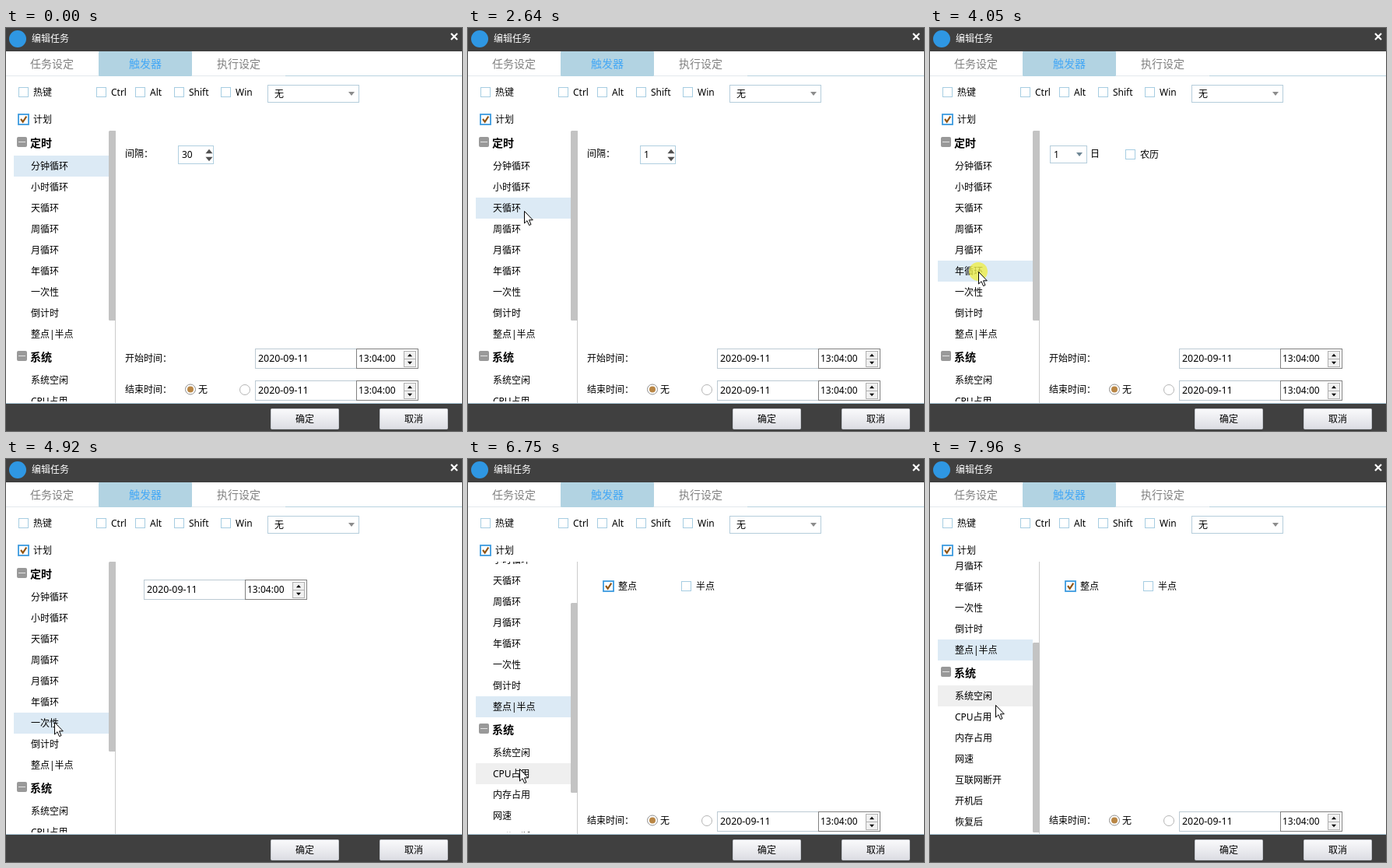
Recreate the animation shown at these times as an HTML page. Size 586 by 518 pixels, loop 8 s.

```html
<!DOCTYPE html>
<html lang="zh-CN">
<head>
<meta charset="utf-8">
<style>
html, body { margin: 0; width: 100%; height: 100%; overflow: hidden; background: #fff; }
svg { display: block; width: 586px; height: 518px; }
text { font-family: "Noto Sans", "Noto Sans CJK SC", "Noto Sans CJK", sans-serif; white-space: pre; }
</style>
</head>
<body>
<svg id="stage" viewBox="0 0 586 518" xmlns="http://www.w3.org/2000/svg">
  <clipPath id="treeClip"><rect x="0" y="132" width="142" height="348"/></clipPath>
  <linearGradient id="face" x2="0" y2="1">
    <stop stop-color="#fafafc"/><stop offset="1" stop-color="#dcdde3"/>
  </linearGradient>
</svg>
<script>
const LOOP = 8000, ROW = 27, HEAD = 32, VIEW_TOP = 132;
const stage = document.getElementById("stage");

function add(parent, tag, attrs = {}) {
  const el = document.createElementNS("http://www.w3.org/2000/svg", tag);
  for (const k in attrs) el.setAttribute(k, attrs[k]);
  parent.appendChild(el);
  return el;
}
const group = (p = stage, attrs) => add(p, "g", attrs);
const fillRect = (p, x, y, width, height, fill, rx = 0) =>
  add(p, "rect", { x, y, width, height, fill, rx });
// Bordered box covering whole pixels, line centred on half pixels
const frame = (p, x, y, w, h, stroke, fill = "#fff", rx = 0) =>
  add(p, "rect", { x: x + .5, y: y + .5, width: w - 1, height: h - 1, stroke, fill, rx });
const path = (p, d, attrs) => add(p, "path", { d, ...attrs });

// Text placed by its left edge and its vertical middle
function label(p, x, cy, str, { size = 12, fill = "#000", weight = 400 } = {}) {
  const el = add(p, "text", { x, y: cy + size * .37, "font-size": size, fill, "font-weight": weight });
  el.textContent = str;
}
function triangle(p, cx, cy, r, dir, fill = "#505050") {
  const h = r * .6 * dir;
  path(p, `M${cx - r} ${cy - h}H${cx + r}L${cx} ${cy + h}Z`, { fill });
}
function checkbox(p, x, y, str, gap, checked) {
  if (checked) {
    add(p, "rect", { x, y, width: 13, height: 13, fill: "#fff", stroke: "#3c9bdf", "stroke-width": 1.8 });
    path(p, `M${x + 3} ${y + 6}L${x + 5.7} ${y + 9.6}L${x + 10.3} ${y + 2.7}`,
      { fill: "none", stroke: "#8f5414", "stroke-width": 2.1 });
  } else frame(p, x, y, 13, 13, "#a6cde2");
  label(p, x + gap, y + 6.5, str);
}
function spinner(p, x, y, w, value) {
  frame(p, x, y, w, 24, "#b0cfe0");
  label(p, x + 5, y + 12, value);
  triangle(p, x + w - 6, y + 7.5, 4.5, -1);
  triangle(p, x + w - 6, y + 17.5, 4.5, 1);
}
function combo(p, x, y, w, value, arrow) {
  frame(p, x, y, w, 23, "#b5cddb");
  label(p, x + (w > 60 ? 9 : 5), y + 11.5, value);
  triangle(p, x + w - 10, y + 11.5, 4, 1, arrow);
}
function dateTime(p, x, y) {
  frame(p, x, y, 131, 26, "#bccad3");
  label(p, x + 4, y + 12.5, "2020-09-11", { size: 12.4 });
  frame(p, x + 130, y, 80, 26, "#808080");
  label(p, x + 133, y + 12.5, "13:04:00");
  for (const dir of [-1, 1]) {
    const top = y + (dir < 0 ? 3 : 13);
    frame(p, x + 191, top, 16, 11, "#b0b0b0", "#f0f0f0");
    triangle(p, x + 199, top + 5.5, 3, dir, "#000");
  }
}
function radio(p, cx, cy, on) {
  add(p, "circle", { cx, cy, r: 6.5, fill: "#fff", stroke: on ? "#909090" : "#b4b4b4" });
  if (on) add(p, "circle", { cx, cy, r: 4, fill: "#b98645" });
}
function button(x, w, str) {
  frame(stage, x, 489, w, 27, "#c5c8ce", "url(#face)", 1);
  label(stage, x + w / 2 - 12, 502.5, str);
}

// Window chrome
fillRect(stage, 0, 0, 586, 518, "#fff");
fillRect(stage, 0, 0, 586, 30, "#404040");
add(stage, "circle", { cx: 15, cy: 14, r: 11, fill: "#2f97e3" });
label(stage, 33, 14, "编辑任务", { fill: "#fff" });
path(stage, "M572 7L580 15M580 7L572 15", { stroke: "#fff", "stroke-width": 2.2 });

fillRect(stage, 0, 61, 119, 1, "#e3e9ed");
fillRect(stage, 239, 61, 120, 1, "#e3e9ed");
fillRect(stage, 359, 61, 227, 1, "#b9d3e0");
fillRect(stage, 119, 30, 120, 32, "#b2d3e2", 1);
label(stage, 31, 46, "任务设定", { size: 14, fill: "#808080" });
label(stage, 158, 46, "触发器", { size: 14, fill: "#45a8f5" });
label(stage, 271, 46, "执行设定", { size: 14, fill: "#808080" });

checkbox(stage, 16, 76, "热键", 19);
[[116, "Ctrl"], [166, "Alt"], [216, "Shift"], [276, "Win"]]
  .forEach(([x, s]) => checkbox(stage, x, 76, s, 19));
combo(stage, 336, 73, 118, "无", "#8c8c8c");
checkbox(stage, 16, 111, "计划", 19, true);

// Tree
fillRect(stage, 140, 132, 1, 350, "#cccccc");
const tree = group(stage, { "clip-path": "url(#treeClip)" });
const list = group(tree);
const hoverBar = fillRect(list, 10, 0, 122, ROW, "#efefef");
const selBar = fillRect(list, 10, 0, 122, ROW, "#dceaf5");
const rowTops = [];
let nextTop = VIEW_TOP;
const sections = [
  ["定时", "分钟循环 小时循环 天循环 周循环 月循环 年循环 一次性 倒计时 整点|半点"],
  ["系统", "系统空闲 CPU占用 内存占用 网速 互联网断开 开机后 恢复后"]
];
for (const [title, items] of sections) {
  fillRect(list, 14, nextTop + 8, 13, 13, "#999", 2);
  fillRect(list, 16, nextTop + 14, 9, 1, "#e4e4e4");
  label(list, 31, nextTop + 16, title, { size: 14, weight: 700 });
  nextTop += HEAD;
  for (const item of items.split(" ")) {
    label(list, 32, nextTop + 13.5, item);
    rowTops.push(nextTop);
    nextTop += ROW;
  }
}
const thumb = fillRect(tree, 132, VIEW_TOP, 9, 244, "#c3c3c3", 1.5);

// Right-hand panels, one per tree row
function interval(value) {
  return g => { label(g, 153, 162, "间隔："); spinner(g, 221, 151, 46, value); };
}
const builders = [
  interval("30"),
  interval("1"),
  interval("1"),
  g => [..."一二三四五六日"].forEach((d, i) => checkbox(g, 154 + i * 61, 156, "周" + d, 19)),
  g => {
    combo(g, 154, 151, 48, "1", "#6f8795");
    label(g, 206, 162, "日");
    checkbox(g, 251, 156, "农历", 19);
  },
  g => {
    combo(g, 154, 151, 48, "1", "#6f8795");
    label(g, 206, 162, "月");
    combo(g, 244, 151, 48, "1", "#6f8795");
    label(g, 296, 162, "日");
    checkbox(g, 341, 156, "农历", 19);
  },
  g => dateTime(g, 177, 155),
  g => [[177, "小时", 221], [250, "分", 291], [310, "秒", 351]].forEach(([x, s, sx]) => {
    spinner(g, x, 154, 40, "0");
    label(g, sx, 166, s);
  }),
  g => { checkbox(g, 174, 157, "整点", 19, true); checkbox(g, 274, 157, "半点", 19); }
];
const panels = builders.map(build => { const g = group(); build(g); return g; });

const startTime = group();
label(startTime, 153, 425, "开始时间：");
dateTime(startTime, 320, 412);
const endTime = group();
label(endTime, 153, 465, "结束时间：");
radio(endTime, 237, 464.5, true);
label(endTime, 247, 465, "无");
radio(endTime, 307, 465, false);
dateTime(endTime, 320, 453);

// Footer
fillRect(stage, 0, 482, 586, 1, "#a9c6d6");
fillRect(stage, 0, 483, 586, 35, "#404040");
button(340, 88, "确定");
button(480, 88, "取消");

// Pointer
const pointer = group();
const halo = add(pointer, "circle", { r: 12, fill: "#eeee4b", "fill-opacity": .8 });
path(pointer, "M.5 .5V16L4 12.7L6.6 18.6L9 17.5L6.5 11.8H11.3Z",
  { fill: "#fff", stroke: "#000", "stroke-width": 1 });

// Moves: first step, last step, step count, x, y
const origin = [525, 533];
const moves = [
  [400, 1160, 12, 83, 201],
  [1820, 2030, 4, 76, 225],
  [2640, 2640, 1, 72, 235],
  [2720, 2810, 2, 69, 257],
  [3240, 3420, 3, 66, 284],
  [3680, 3850, 3, 62, 313],
  [4250, 4320, 2, 62, 338],
  [4940, 5140, 4, 61, 366],
  [5680, 5890, 4, 60, 397],
  [6350, 6420, 2, 66, 398],
  [7430, 7960, 8, 84, 316]
];
// Clicks: press selects the next row, release swaps the panel
const clicks = [[1360, 1490], [2110, 2240], [2890, 2980], [3490, 3590],
  [4050, 4180], [4730, 4860], [5470, 5600], [6020, 6150]];
const scrolls = [[6620, 21], [6750, 75], [7020, 129], [7350, 148]];

function pointerAt(t) {
  let [x, y] = origin;
  for (const [from, to, n, tx, ty] of moves) {
    if (t < from) break;
    const gap = (to - from) / (n - 1 || 1) || 1;
    const k = t >= to ? 1 : (Math.floor((t - from) / gap) + 1) / n;
    x += (tx - x) * k;
    y += (ty - y) * k;
  }
  return [Math.round(x), Math.round(y)];
}
const show = (el, on) => el.setAttribute("display", on ? "inline" : "none");

function render(t) {
  const [x, y] = pointerAt(t);
  const selected = clicks.filter(c => t >= c[0]).length;
  const panel = clicks.filter(c => t >= c[1]).length;
  const scroll = scrolls.reduce((s, [at, v]) => t >= at ? v : s, 0);
  const hovered = rowTops.findIndex(top => y + scroll >= top && y + scroll < top + ROW);

  show(pointer, t >= 400);
  pointer.setAttribute("transform", `translate(${x} ${y})`);
  show(halo, clicks.some(([a, b]) => t >= a && t < b));

  list.setAttribute("transform", `translate(0 ${-scroll})`);
  thumb.setAttribute("y", VIEW_TOP + Math.round(scroll * 104 / 148));
  selBar.setAttribute("y", rowTops[selected]);
  const hovering = t >= clicks[0][0] && hovered >= 0 && x < 132;
  show(hoverBar, hovering);
  if (hovering) hoverBar.setAttribute("y", rowTops[hovered]);

  panels.forEach((g, i) => show(g, i === panel));
  show(startTime, panel < 6 || panel === 7);
  show(endTime, panel < 6 || panel === 8);
}

const began = performance.now();
function tick() {
  render((performance.now() - began) % LOOP);
  requestAnimationFrame(tick);
}
tick();
</script>
</body>
</html>
```
